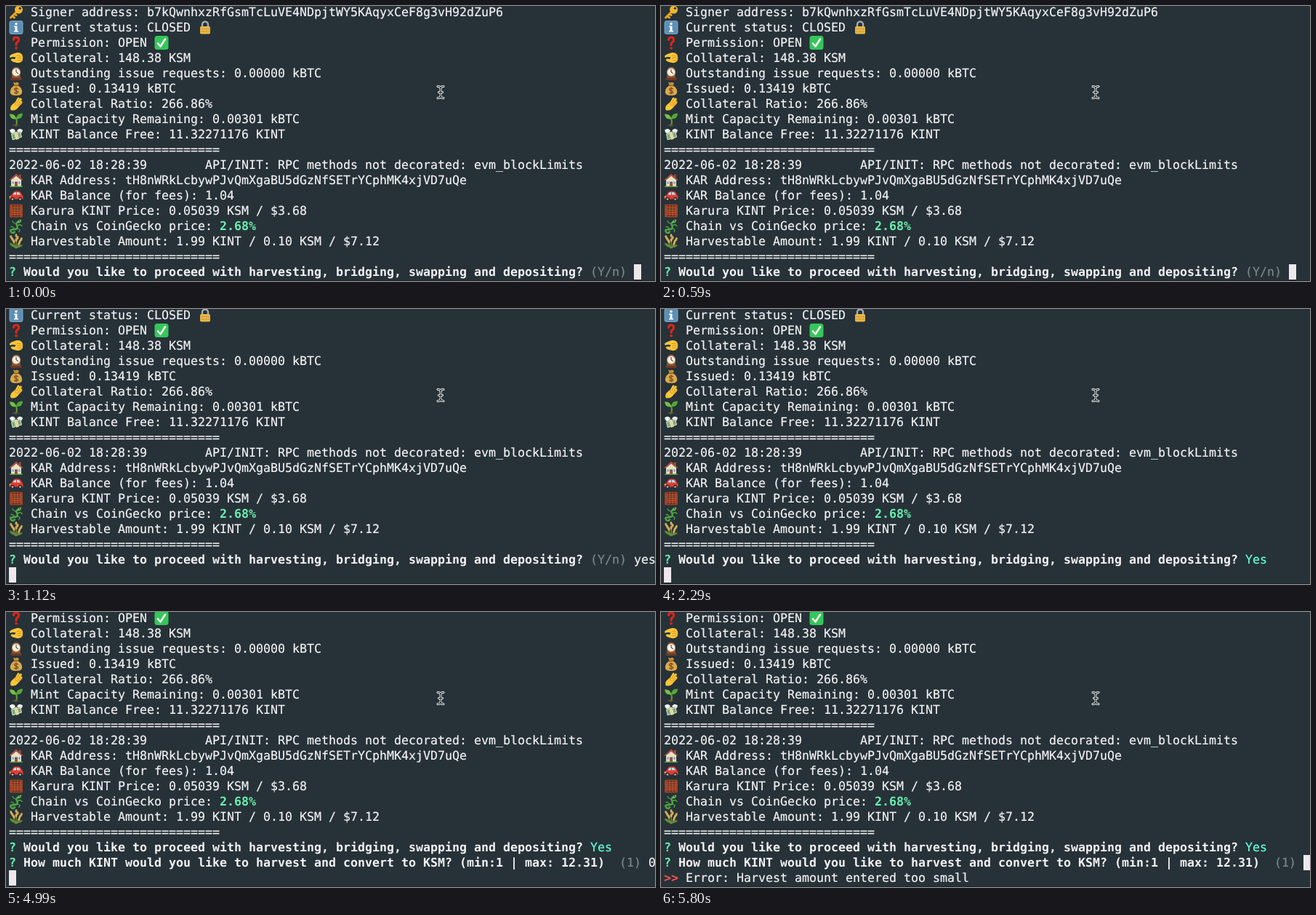
Recreate the animation shown at these times as an HTML page. Size 893 by 378 pixels, loop 8 s.

```html
<!DOCTYPE html>
<html lang="en">
<head>
<meta charset="utf-8">
<title>Terminal</title>
<style>
html, body { margin: 0; width: 100%; height: 100%; overflow: hidden; background: #263238; }
svg { display: block; }
text {
  font: 16.61px "DejaVu Sans Mono", monospace;
  white-space: pre;
  text-rendering: geometricPrecision;
  stroke-width: .2;
}
.bold { font-weight: bold; stroke-width: 0; }
</style>
</head>
<body>
<svg id="stage" width="893" height="378" viewBox="0 0 893 378">
  <rect width="893" height="378" fill="#263238"/>
  <g id="screen"></g>
  <rect y="377" width="893" height="1" fill="#1c262b"/>
  <g id="pointer" fill="none" stroke-linecap="round">
    <path id="beam" d="M594 110.5q4 0 4 3v10q0 3-4 3M602 110.5q-4 0-4 3v10q0 3 4 3M595.5 118.5h5" stroke="#f4f4f4" stroke-width="3"/>
    <path d="M594 110.5q4 0 4 3v10q0 3-4 3M602 110.5q-4 0-4 3v10q0 3 4 3M595.5 118.5h5" stroke="#11171a" stroke-width="1.1"/>
  </g>
</svg>
<script>
const CELL = 10, LINE = 21, LEFT = 4, TOP = -2, LOOP = 8000;
const WHITE = '#f3f1f3', GREEN = '#69f0ae', CYAN = '#64ffda', GREY = '#7d868a', RED = '#ff5252';

const path = (d, fill) => `<path d="${d}" fill="${fill}"/>`;
const line = (d, color, width = 1) =>
  `<path d="${d}" fill="none" stroke="${color}" stroke-width="${width}" stroke-linecap="round" stroke-linejoin="round"/>`;
const disc = (x, y, r, fill) => `<circle cx="${x}" cy="${y}" r="${r}" fill="${fill}"/>`;
const box = (x, y, w, h, fill, r = 0) =>
  `<rect x="${x}" y="${y}" width="${w}" height="${h}" rx="${r}" fill="${fill}"/>`;

// Each icon fills a 20 by 20 box
const icons = {
  key: line('M11 9L2.500 17.500M5 15l2.500 2.500M8 12l2 2', '#e8a51f', 3) +
    disc(13.500, 6.500, 5.500, '#f4b62c') + disc(15.300, 4.700, 1.600, '#263238'),
  info: box(.5, .5, 19, 19, '#6f9fc2', 3.500) + box(2, 2, 16, 16, '#5d8fb5', 2) +
    disc(10, 5, 1.700, '#fff') + path('M7 8h4.500v6.500H13V16H7v-1.500h1.500v-5H7z', '#fff'),
  lock: line('M6 9V6a4 4 0 0 1 8 0v3', '#a9adb0', 2.400) +
    box(3, 8.500, 14, 10.500, '#e9b84a', 1.800) + line('M4 12h12M4 15.500h12', '#c98f2b', .8),
  question: line('M6.500 6Q6.500 2.500 10 2.500T13.500 6Q13.500 8 11.500 9.300T10 13', '#d9251d', 3.200) +
    disc(10, 17.300, 1.900, '#d9251d'),
  check: box(.5, .5, 19, 19, '#35c759', 3.500) + line('M5 11l3.500 4L15 5', '#fff', 2.600),
  pinch: path('M1 7Q4 4 8 3.500Q14 1 18 5Q20 9 18.500 14Q15 18 9 16Q4 15 2.500 12.500L4 11L8 11.500L9.500 9L5 8.500L1.500 9.500z', '#fbc638') +
    line('M11 7q4-1 6 1M11.500 10q3-1 6 .5M12 13q3-.5 5 .5', '#d38d20', .9),
  clock: path('M3 19Q5 15 4 10Q4 1 10 1T16 10Q15 15 17 19z', '#8a5034') + box(2, 16.500, 16, 2.500, '#6c3925', 1) +
    disc(10, 8.500, 6, '#c9a071') + disc(10, 8.500, 5, '#f5f0e4') + line('M10 5v3.500l2.500 1.500', '#30302f', 1),
  bag: path('M7 6Q1 10 2 16Q3 19.500 10 19.500T18 16Q19 10 13 6z', '#dca94e') +
    path('M6 1l3 1 2-1 3 1.500L12.500 6h-5z', '#c88f39') + line('M7 6h6', '#8d5d26', 1.400) +
    line('M12.500 10.500Q10 8.500 8 10T10 13T12 16T7.500 15.500M10 8.500v9', '#6e4b1e', 1.200),
  fingers: path('M2.500 18.500Q1 14 4.500 11L9 7L12 1.500Q14 0 14.500 2.500L17 2Q18.500 3 17 6L18.500 7Q19 9 15.500 12L11 17Q8 20 2.500 18.500z', '#fbc638') +
    line('M14 3l-3 6M16.500 5l-4 6M17.500 8l-5 5M9 8q-2 4 2 4', '#d38d20', .9),
  sprout: line('M9.500 19Q12 15 10 9', '#5fa437', 2) + path('M10 10Q2 11 1 3Q9 2 10 10z', '#77c043') +
    path('M10 10Q10 2 19 2Q19 10 10 10z', '#57a635') + path('M4 19q5-4 11 0z', '#6f4b31'),
  cash: path('M1 4Q6 0 9 5L6 9Q2 9 1 4M19 4Q14 0 11 5l3 4Q18 9 19 4z', '#eef1ef') +
    path('M3 9l13-3 2 8-13 4z', '#79a778') + line('M4 10l12-3 1.400 6.500-12 3.500z', '#d7e3c4', 1) +
    disc(10.500, 12, 2.500, '#d7e3c4') + path('M7 7l4-1 3 10-4 1.500z', '#e3d6a6'),
  house: box(3, 9, 14, 10, '#eadfc9') + box(14, 2, 2.500, 6, '#9a5139') +
    path('M10 1L20 10H17.500L10 4L2.500 10H0z', '#b34e38') + path('M10 4l7 6H3z', '#eadfc9') +
    box(8, 12, 4, 7, '#925234') + box(4.200, 12, 2.800, 3, '#6bb0db') + box(13, 12, 2.800, 3, '#6bb0db') +
    box(1, 18, 18, 1.500, '#5c973f'),
  car: path('M.5 14Q.5 10 4 9Q6 4 9 4h4Q16 4 18 9Q20 10 19.500 15H1z', '#e23c30') +
    path('M5.500 9Q7 5.500 9 5.500h1V9zM11 5.500h2Q15 6 16 9h-5z', '#b9dceb') +
    [5, 15.500].map(x => disc(x, 15, 2.700, '#272b2e') + disc(x, 15, 1.300, '#b8bcbf')).join('') +
    disc(1.500, 11.800, .9, '#ffe17c'),
  abacus: box(1, 1, 18, 18, '#9b3f22', 1.500) + box(3, 3, 14, 14, '#36251f') +
    [4, 8, 12, 16].map(x => line(`M${x} 3v14`, '#d49a56', .6)).join('') +
    [5, 10, 12.500, 15].map(y => line(`M3.500 ${y}h13`, '#d74c2b', 1.500)).join('') + box(2, 7, 16, 1.200, '#b75a35'),
  lizard: line('M14 4Q9 5 11 9T10 14T4 15T3 18T8 18', '#4fa345', 2.500) +
    line('M10 7L6 5 5 3M12 9l4-1 2 2M11 13l4 2-1 3M8 14L5 11 3 11', '#4fa345', 1.300) +
    path('M11 5Q12 1 17 1Q18 4 14 6z', '#65b94d') + disc(14.700, 2.800, .7, '#172719'),
  wheat: line('M9 19Q7 11 3 6M10 19Q10 9 11 5M11 19Q13 12 17 9', '#71943d', 1.400) +
    [[3, 4], [5, 7], [7, 10], [10, 2], [12, 5], [10, 8], [17, 7], [15, 10], [14, 13]]
      .map(([x, y]) => `<ellipse cx="${x}" cy="${y}" rx="1.500" ry="2.500" fill="#d8ac55" transform="rotate(${(x - 10) * 4} ${x} ${y})"/>`).join('') +
    path('M9 19Q1 17 1 12Q7 13 10 19Q13 14 19 15Q17 19 9 19z', '#638b38')
};

const x = col => LEFT + col * CELL;
const y = row => TOP + row * LINE;
const text = (row, col, words, color = WHITE, bold = false) =>
  `<text x="${x(col)}" y="${y(row) + 16}" fill="${color}" stroke="${color}"${bold ? ' class="bold"' : ''}>${words.replace(/>/g, '&gt;')}</text>`;
const icon = (row, col, name) =>
  `<g transform="translate(${x(col)} ${y(row) + .5})">${icons[name]}</g>`;
const cursor = (row, col) => box(x(col), y(row), CELL, LINE, '#eee8ec');
const ask = (row, words) => text(row, 0, '?', GREEN, true) + text(row, 2, words, WHITE, true);

const RULE = '='.repeat(29);
const report = [
  ['key', 'Signer address: b7kQwnhxzRfGsmTcLuVE4NDpjtWY5KAqyxCeF8g3vH92dZuP6'],
  ['info', 'Current status: CLOSED'],
  ['question', 'Permission: OPEN'],
  ['pinch', 'Collateral: 148.38 KSM'],
  ['clock', 'Outstanding issue requests: 0.00000 kBTC'],
  ['bag', 'Issued: 0.13419 kBTC'],
  ['fingers', 'Collateral Ratio: 266.86%'],
  ['sprout', 'Mint Capacity Remaining: 0.00301 kBTC'],
  ['cash', 'KINT Balance Free: 11.32271176 KINT'],
  ['', RULE],
  ['', '2022-06-02 18:28:39        API/INIT: RPC methods not decorated: evm_blockLimits'],
  ['house', 'KAR Address: tH8nWRkLcbywPJvQmXgaBU5dGzNfSETrYCphMK4xjVD7uQe'],
  ['car', 'KAR Balance (for fees): 1.04'],
  ['abacus', 'Karura KINT Price: 0.05039 KSM / $3.68'],
  ['lizard', 'Chain vs CoinGecko price:'],
  ['wheat', 'Harvestable Amount: 1.99 KINT / 0.10 KSM / $7.12'],
  ['', RULE]
];

const fixed = report.map(([name, words], row) =>
  name ? icon(row, 0, name) + text(row, 3, words) : text(row, 0, words)).join('') +
  icon(1, 26, 'lock') + icon(2, 20, 'check') + text(14, 29, '2.68%', GREEN, true) +
  ask(17, 'Would you like to proceed with harvesting, bridging, swapping and depositing?');

const steps = [
  { at: 0, typed: '', caret: [17, 86] },
  { at: 770, typed: 'y', caret: [17, 87] },
  { at: 860, typed: 'ye', caret: [17, 88] },
  { at: 1120, typed: 'yes', caret: [18, 0], scroll: 1 },
  { at: 2290, done: true, caret: [18, 0], scroll: 1 },
  { at: 2380, done: true, amount: ' ', caret: [18, 88], scroll: 1 },
  { at: 4990, done: true, amount: '0', caret: [19, 0], scroll: 2 },
  { at: 5800, done: true, amount: ' ', error: true, caret: [18, 88], scroll: 2 }
];

function render(s) {
  let out = fixed;
  out += s.done ? text(17, 80, 'Yes', CYAN)
    : text(17, 80, '(Y/n)', GREY) + text(17, 86, s.typed);
  if (s.amount) {
    out += ask(18, 'How much KINT would you like to harvest and convert to KSM? (min:1 | max: 12.31)') +
      text(18, 84, '(1)', GREY) + text(18, 88, s.amount);
  }
  if (s.error) out += text(19, 0, '>>', RED, true) + text(19, 3, 'Error: Harvest amount entered too small');
  out += cursor(...s.caret);
  screenGroup.innerHTML = out;
  screenGroup.setAttribute('transform', `translate(0 ${-LINE * (s.scroll || 0)})`);
}

const screenGroup = document.getElementById('screen');
const start = performance.now();
let shown;

function tick() {
  const t = (performance.now() - start) % LOOP;
  const step = steps.filter(s => s.at <= t).pop();
  if (step !== shown) render(shown = step);
  requestAnimationFrame(tick);
}
tick();
</script>
</body>
</html>
```
